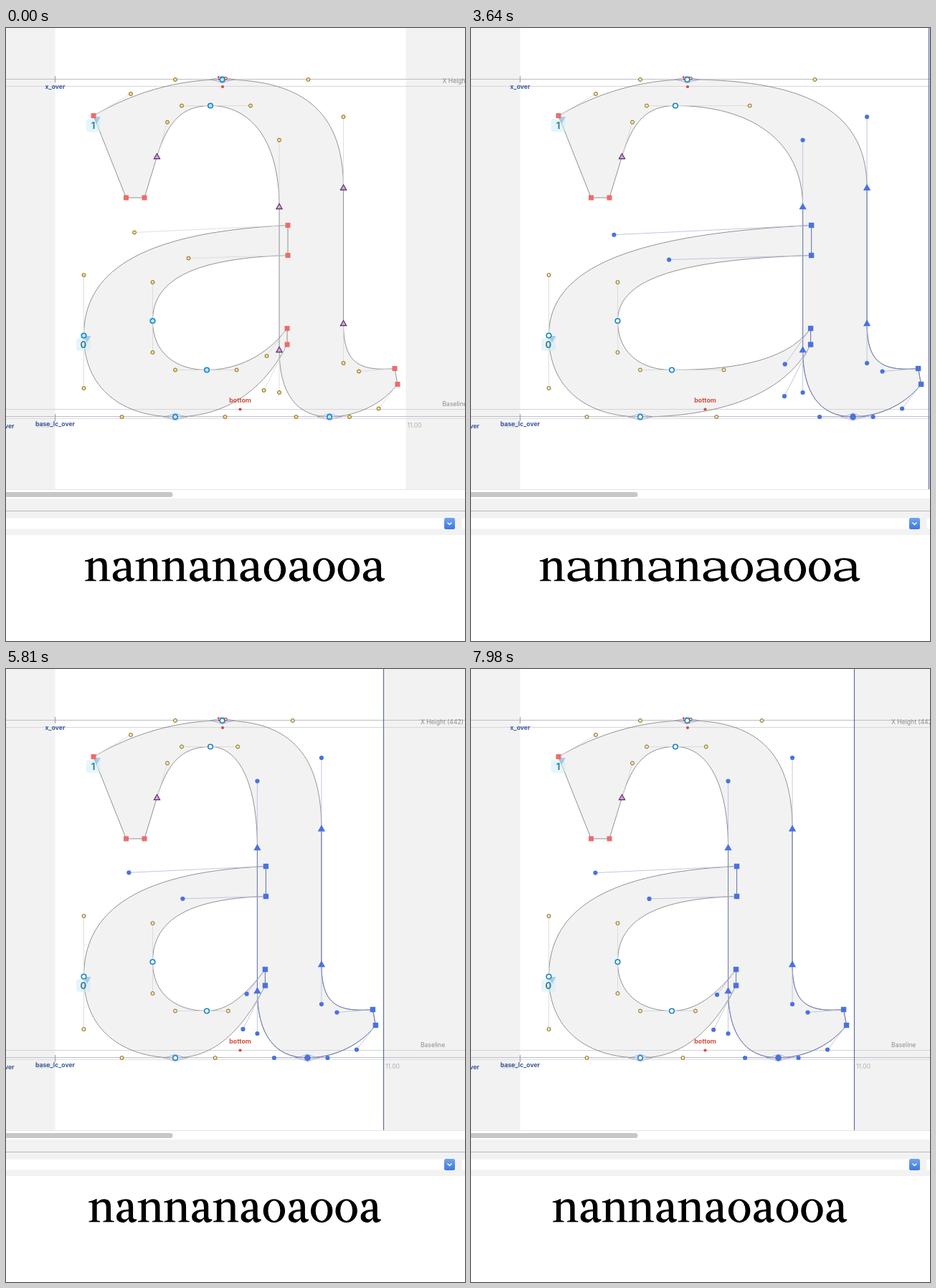
Recreate the animation shown at these times as an HTML page with a canvas. Size 640x856 px, loop 8 s.

```html
<!DOCTYPE html>
<html lang="en">
<head>
<meta charset="utf-8">
<title>Glyph editor</title>
<style>
  html, body { margin: 0; width: 100%; height: 100%; overflow: hidden; background: #fff; }
  canvas { display: block; width: 640px; height: 856px; }
</style>
</head>
<body>
<canvas id="stage" width="640" height="856" role="img" aria-label="nannanaoaooa"></canvas>
<script>
const ctx = document.getElementById('stage').getContext('2d');
const LOOP = 8000, UNIT = 1.02, GRAY = '#f2f2f2', BLUE = '#4a72df';
const POINTS_SELECTED = 1330, MARGIN_SELECTED = 1960, FINE_STEPS = 7560;
const LEFT = 69, RIGHT = 557.3, SCALE = 0.0695, WORD = 'nannanaoaooa';
const KEYS = [[0, 0], [2600, 0], [3500, 80], [3700, 80], [4340, 40],
              [5250, -10], [5600, -30], [7560, -30], [7980, -22], [8000, -22]];

// The stem is nudged in steps of ten units, then of one unit.
function stemOffset(t) {
  const i = KEYS.findIndex(k => k[0] > t);
  const [t0, v0] = KEYS[i - 1], [t1, v1] = KEYS[i];
  const value = v0 + (v1 - v0) * (t - t0) / (t1 - t0);
  const step = t > FINE_STEPS ? 1 : 10;
  return Math.round(value / step) * step * UNIT;
}

function outlines(d) {
  const node = (type, x, y, before, after) => ({ type, at: [x, y], before, after, moving: false });
  const stem = (type, x, y, before, after) => ({ type, at: [x + d, y], before, after, moving: true });
  const h = (x, y, kx = 0, ky = 0) => [x + kx * d, y + ky * d];
  const m = (x, y) => [x + d, y];
  return [[
    node('corner', 122, 122.5, null, h(174, 92)),
    node('smooth', 301.5, 72, h(236, 72), h(421.5, 72, .71)),
    stem('tangent', 470.5, 223, m(470.5, 124), null),
    stem('tangent', 470.5, 412.5, null, m(470.5, 468)),
    stem('corner', 542, 475.5, m(492, 479.5), null),
    stem('corner', 546, 497.5, null, m(519.5, 531.5)),
    stem('smooth', 451, 543, m(479, 543), m(404.5, 543)),
    stem('tangent', 381, 449.5, m(381, 509), null),
    stem('tangent', 381, 249.5, null, m(381, 156.5)),
    node('smooth', 285, 108.5, h(341, 108.5, .585), h(245, 108.5)),
    node('tangent', 210.5, 179.5, h(225, 131.5), null),
    node('corner', 193, 237),
    node('corner', 167.5, 237)
  ], [
    node('smooth', 108.5, 429.5, h(108.5, 503), h(108.5, 345)),
    stem('corner', 393, 275.5, h(179, 285.5, .25, .04), null),
    stem('corner', 393, 317.5, null, h(254.5, 321.5, .265, .025)),
    node('smooth', 204.5, 409, h(204.5, 355), h(204.5, 453)),
    node('smooth', 280, 477.5, h(236, 477.5), h(321.5, 477.5, .38)),
    stem('corner', 392, 419.5, h(363.5, 458, .91, .14), null),
    stem('corner', 392, 442, null, h(359.5, 506, .95, .1)),
    node('smooth', 236, 543, h(305.5, 543, .45), h(161.5, 543))
  ]];
}

function addSegment(path, a, b) {
  if (a.after && b.before) path.bezierCurveTo(...a.after, ...b.before, ...b.at);
  else path.lineTo(...b.at);
}

function glyphPath(contours) {
  const path = new Path2D();
  for (const nodes of contours) {
    path.moveTo(...nodes[0].at);
    nodes.forEach((a, i) => addSegment(path, a, nodes[(i + 1) % nodes.length]));
    path.closePath();
  }
  return path;
}

const letterN = new Path2D(`M8 120C60 112 112 94 156 70H172V145C212 100 262 72 322 72
  C408 72 450 125 450 215V480C450 505 470 508 519 514V533H298V514C344 508 360 505 360 480
  V235C360 165 332 133 280 133C238 133 200 155 172 182V480C172 505 191 508 236 514V533H12V514
  C62 508 82 505 82 480V165C82 145 64 140 8 140Z`);
const letterO = new Path2D();
letterO.ellipse(248, 307, 219, 236, 0, 0, 2 * Math.PI);
letterO.closePath();
letterO.moveTo(370, 307);
letterO.ellipse(248, 307, 122, 203, 0, 0, 2 * Math.PI);

function rect(x, y, w, h, color) {
  ctx.fillStyle = color;
  ctx.fillRect(x, y, w, h);
}

function roundRect(x, y, w, h, color, radius) {
  ctx.fillStyle = color;
  ctx.beginPath();
  ctx.roundRect(x, y, w, h, radius);
  ctx.fill();
}

function line(x1, y1, x2, y2, color, width = 1) {
  ctx.strokeStyle = color;
  ctx.lineWidth = width;
  ctx.beginPath();
  ctx.moveTo(x1, y1);
  ctx.lineTo(x2, y2);
  ctx.stroke();
}

function label(text, x, y, color, weight = 400, align = 'left', size = 8.6) {
  ctx.font = `${weight} ${size}px Inter, sans-serif`;
  ctx.textAlign = align;
  ctx.fillStyle = color;
  ctx.fillText(text, x, y);
}

function dot(x, y, r, fill, stroke, width = 1) {
  ctx.beginPath();
  ctx.arc(x, y, r, 0, 2 * Math.PI);
  ctx.fillStyle = fill;
  ctx.fill();
  if (!stroke) return;
  ctx.strokeStyle = stroke;
  ctx.lineWidth = width;
  ctx.stroke();
}

function triangle(x, y, r, fill, stroke, flip = 1) {
  ctx.beginPath();
  ctx.moveTo(x, y - r * flip);
  ctx.lineTo(x + r, y + r * .75 * flip);
  ctx.lineTo(x - r, y + r * .75 * flip);
  ctx.closePath();
  ctx.fillStyle = fill;
  ctx.fill();
  if (!stroke) return;
  ctx.strokeStyle = stroke;
  ctx.lineWidth = 1.1;
  ctx.stroke();
}

function drawNode({ type, at: [x, y] }, active, dimmed) {
  if (type === 'corner') {
    const s = active ? 7.4 : 7;
    rect(x - s / 2, y - s / 2, s, s, active ? BLUE : '#ec6c6c');
  } else if (type === 'tangent') {
    triangle(x, y, 4.2, active ? BLUE : '#d3a0dc', active ? BLUE : '#55305f');
  } else if (active) {
    dot(x, y, 4.4, BLUE);
  } else {
    dot(x, y, 3.3, dimmed ? '#fff' : '#b9e6ff', '#1583c6', 1.6);
  }
}

function drawMetrics(d) {
  line(0, 71.5, 640, 71.5, '#bbbcc4');
  line(0, 81.5, 640, 81.5, '#d6d6da');
  line(0, 532.5, 640, 532.5, '#d2d3d8');
  line(0, 542.5, 640, 542.5, '#bcbecb');
  line(0, 545.5, 640, 545.5, '#dedee4');
  line(68.5, 67, 68.5, 76, '#999');
  line(68.5, 539, 68.5, 549, '#999');
  label('X Height (442)', 608.5 + d, 76.5, '#8c8c8c');
  label('Baseline', 608.5 + d, 527.5, '#8c8c8c');
  label('11.00', 559.5 + d, 558, '#b0b0b0');
  label('56.00', 66, 558, '#d0d0d0', 400, 'right');
  label('x_over', 68.5, 85, '#3b579f', 700, 'center');
  label('base_lc_over', 68.5, 556, '#3b579f', 700, 'center');
  label('over', 11.5, 559, '#3b579f', 700, 'right');
}

function drawBadge(text, x, y) {
  roundRect(x - 10, y - 9, 20, 18, 'rgba(205,238,244,.55)', 4);
  triangle(x + 5, y - 8, 5.5, 'rgba(125,178,220,.6)', null, -1);
  label(text, x, y + 4.5, '#3d7f95', 700, 'center', 13);
}

function drawAnchor(text, x, textY, dotY) {
  label(text, x, textY, '#cf4f3d', 700, 'center', 8.8);
  dot(x, dotY, 2.1, '#c55340');
}

function drawOvershoot(x, y) {
  ctx.strokeStyle = '#8d93bd';
  ctx.lineWidth = .7;
  ctx.beginPath();
  ctx.moveTo(x - 17, y);
  ctx.quadraticCurveTo(x - 8, y - 1, x, y - 5);
  ctx.quadraticCurveTo(x + 8, y - 1, x + 17, y);
  ctx.quadraticCurveTo(x + 8, y + 1, x, y + 5);
  ctx.quadraticCurveTo(x - 8, y + 1, x - 17, y);
  ctx.stroke();
}

function drawSelectedEdges(contours) {
  const edges = new Path2D();
  for (const nodes of contours) nodes.forEach((a, i) => {
    const b = nodes[(i + 1) % nodes.length];
    if (!a.moving || !b.moving) return;
    edges.moveTo(...a.at);
    addSegment(edges, a, b);
  });
  ctx.strokeStyle = '#6c7cbd';
  ctx.lineWidth = .9;
  ctx.stroke(edges);
}

function drawEditing(contours, path, selected) {
  const nodes = contours.flat();
  const active = n => selected && n.moving;
  const handles = n => [n.before, n.after].filter(Boolean);

  ctx.strokeStyle = '#666';
  ctx.lineWidth = .7;
  ctx.stroke(path);
  if (selected) drawSelectedEdges(contours);

  for (const n of nodes) {
    for (const p of handles(n)) line(...n.at, ...p, active(n) ? '#b3b9d6' : '#d6d6d6', .8);
    const [x, y] = n.at;
    if (n.type === 'smooth' && (y === 72 || y === 543)) drawOvershoot(x, y);
  }
  drawBadge('1', 121.5, 136);
  drawBadge('0', 108, 442);
  drawAnchor('top', 302, 73, 82);
  drawAnchor('bottom', 326.5, 523, 532.5);
  for (const n of nodes) {
    for (const [x, y] of handles(n)) {
      if (active(n)) dot(x, y, 3.1, BLUE);
      else dot(x, y, 2.5, selected ? '#fae6ae' : '#fbdc7c', '#80682f');
    }
    drawNode(n, active(n), selected);
  }
}

function drawPanel() {
  rect(0, 644, 640, 212, '#fff');
  line(0, 644.5, 640, 644.5, '#e6e6e6');
  roundRect(-10, 648, 242.5, 7, '#c7c7c7', 3.5);
  rect(0, 657, 640, 51, GRAY);
  line(0, 674.5, 640, 674.5, '#b8b8b8');
  roundRect(-5, 684.5, 631, 15, '#fff', 3);
  roundRect(635.5, 684.5, 20, 15, '#fff', 3);
  const blue = ctx.createLinearGradient(0, 684, 0, 700);
  blue.addColorStop(0, '#70a5ee');
  blue.addColorStop(1, '#3c78e3');
  roundRect(611, 684, 15, 16, blue, 2.5);
  ctx.strokeStyle = '#fff';
  ctx.lineWidth = 1.4;
  ctx.beginPath();
  ctx.moveTo(615.5, 690.5);
  ctx.lineTo(618.5, 693.5);
  ctx.lineTo(621.5, 690.5);
  ctx.stroke();
}

function drawWord(path, d) {
  const glyphs = {
    n: { path: letterN, start: 0, advance: 527 },
    o: { path: letterO, start: 0, advance: 496 },
    a: { path, start: LEFT, advance: RIGHT - LEFT + d }
  };
  const letters = [...WORD].map(c => glyphs[c]);
  const width = letters.reduce((sum, g) => sum + g.advance, 0);
  ctx.save();
  ctx.translate(319.2 - width * SCALE / 2, 772.3);
  ctx.scale(SCALE, SCALE);
  ctx.translate(0, -533);
  ctx.fillStyle = '#000';
  for (const g of letters) {
    ctx.translate(-g.start, 0);
    ctx.fill(g.path, g.path === letterO ? 'evenodd' : 'nonzero');
    ctx.translate(g.start + g.advance, 0);
  }
  ctx.restore();
}

function draw(t) {
  const d = stemOffset(t), margin = Math.floor(RIGHT + d) + .5;
  const contours = outlines(d), path = glyphPath(contours);
  rect(0, 0, 640, 856, '#fff');
  rect(0, 0, LEFT - .5, 644, GRAY);
  rect(margin, 0, 640 - margin, 644, GRAY);
  ctx.fillStyle = GRAY;
  ctx.fill(path);
  drawMetrics(d);
  if (t >= MARGIN_SELECTED) line(margin, 0, margin, 644, d ? '#5f6da6' : '#777', 1.2);
  drawEditing(contours, path, t >= POINTS_SELECTED);
  drawPanel();
  drawWord(path, d);
}

const start = performance.now();
function tick() {
  draw((performance.now() - start) % LOOP);
  requestAnimationFrame(tick);
}
tick();
</script>
</body>
</html>
```
